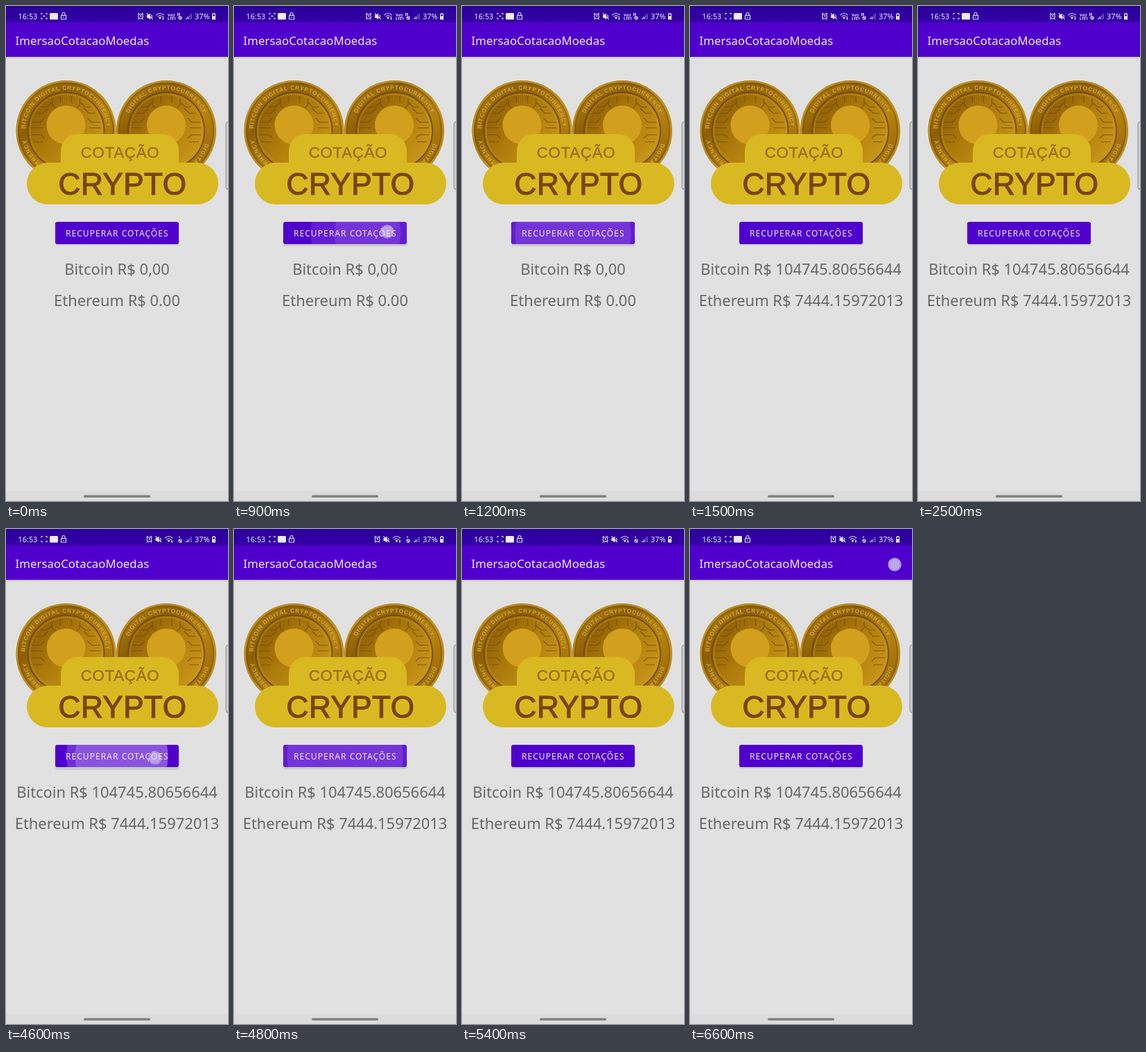
Write an HTML page that moves like this. It is 320 by 711 pixels and loops after 6.7 s.

```html
<!DOCTYPE html>
<html lang="pt">
<head>
<meta charset="utf-8">
<title>Cotação</title>
<style>
html, body { margin: 0; height: 100%; overflow: hidden; background: #e1e1e2; }
svg { display: block; width: 100vw; height: 100vh; font-family: "Noto Sans", sans-serif; }
.mid { text-anchor: middle; }
.price { font-size: 21.9px; fill: #686868; }
.line { fill: none; stroke: #e4dcf8; stroke-width: 1.1; }
.logo { font-family: "Liberation Sans", Arial, sans-serif; }
.rim { font: bold 8.2px "Liberation Sans", Arial, sans-serif; fill: #d2a538; letter-spacing: .9px; }
</style>
</head>
<body>
<svg viewBox="0 0 320 711" preserveAspectRatio="none">
  <defs>
    <linearGradient id="gold" x1="0" y1="0" x2="1" y2="1">
      <stop offset="0" stop-color="#bd8c12"/><stop offset=".3" stop-color="#8d5f04"/>
      <stop offset=".6" stop-color="#b5830f"/><stop offset="1" stop-color="#8d5d04"/>
    </linearGradient>
    <linearGradient id="face" x1="0" y1="0" x2="1" y2=".8">
      <stop offset="0" stop-color="#825403"/><stop offset=".5" stop-color="#ad7b0a"/>
      <stop offset="1" stop-color="#cb9919"/>
    </linearGradient>
    <linearGradient id="bar" x2="0" y2="1">
      <stop offset="0" stop-color="#2c009b"/><stop offset="1" stop-color="#3300a4"/>
    </linearGradient>
    <linearGradient id="shade" x2="0" y2="1">
      <stop offset="0" stop-color="#000" stop-opacity=".14"/><stop offset="1" stop-color="#000" stop-opacity="0"/>
    </linearGradient>
    <clipPath id="clip"><rect x="71" y="310" width="178" height="32" rx="3"/></clipPath>
    <path id="ring" d="M0 59A59 59 0 0 1 0-59A59 59 0 0 1 0 59"/>
    <path id="trace" d="M-49-12h12l6-6M-50-4h16M-50 6h14l5 5M-47 16h14M-42-25h9l7-7M-36-34h9l6-6M-20-46v9l5 5M-8-50v10"/>
    <g id="coin">
      <circle r="72" fill="url(#gold)"/>
      <circle r="70.5" fill="none" stroke="#c8971f" stroke-width="1.6"/>
      <circle r="68" fill="none" stroke="#6f4703" opacity=".7"/>
      <circle r="55" fill="url(#face)" stroke="#6d4503" stroke-width="1.5"/>
      <circle r="52" fill="none" stroke="#c99b28" stroke-width="1.6" stroke-dasharray="1.2 1.6"/>
      <g fill="none" stroke="#6d4503" stroke-width="1.2" opacity=".75">
        <use href="#trace"/><use href="#trace" transform="scale(-1 1)"/>
      </g>
      <circle cy="-8" r="28" fill="#d3a01d"/>
    </g>
  </defs>

  <rect width="320" height="711" fill="#e1e1e2"/>
  <rect y="697" width="320" height="14" fill="#dcdcdd"/>
  <rect x="112" y="702.5" width="96" height="3.5" rx="1.75" fill="#828283"/>
  <rect y="73" width="320" height="3" fill="url(#shade)"/>
  <rect y="23" width="320" height="50" fill="#5000cd"/>
  <rect width="320" height="23.5" fill="url(#bar)"/>
  <rect x="317" y="166.5" width="8" height="97" rx="3" fill="#d0d0d1" stroke="#858586"/>

  <g fill="#eee8fc" font-size="10.9">
    <text x="17.5" y="19">16:53</text>
    <path class="line" d="M51 12.5v-2h2M57 10.5h2v2M59 16.5v2h-2M53 18.5h-2v-2"/>
    <path id="dash" class="line" d="M53 14.5h4"/>
    <rect x="63" y="10" width="12" height="9.500" rx="1.5"/>
    <path class="line" d="M79.5 13.5h7v5.5h-7zM81 13.5v-2a2 2 0 0 1 4 0v2M83 15.5v1.5"/>
    <g id="left">
      <circle class="line" cx="194" cy="15" r="3.3"/>
      <path class="line" d="M194 13v2h1.5M190 12l2-2M198 12l-2-2M191.5 18l-1 1.5M196.5 18l1 1.5"/>
      <path d="M203 13h2l3-2.5v9l-3-2.5h-2z"/>
      <path class="line" d="M203 10.5l8.5 8.5M209.5 12.5q2 2.5 0 5"/>
      <path class="line" d="M216.5 13q5.500-5 11 0M218.5 15.2q3.500-3 7 0"/>
      <path d="M220 16.5q2-1.5 4 0l-2 2.5z"/>
      <path class="line" d="M226.5 15v4m-1-1l1 1 1-1"/>
    </g>
    <g id="volte" font-size="5.4" font-weight="600">
      <text x="233" y="14.5">Vo))</text><text x="233" y="19.8">LTE1</text>
      <path class="line" d="M247.5 10v4M249.5 10v4"/>
    </g>
    <path class="line" d="M248.8 17a2.200 2.200 0 1 0 4.400 0a2.200 2.200 0 1 0-4.400 0M249.5 15.5l3 3M250 10v3"/>
    <path d="M259.5 17h1.2v2h-1.2zM261.7 15.2h1.2V19h-1.2z"/>
    <path opacity=".45" d="M263.9 13.3h1.2V19h-1.2zM266.1 11h1.3v8h-1.300z"/>
    <text x="272" y="19">37%</text>
    <path d="M298.500 10h2v1h1.500v8.500h-5V11h1.500z"/>
    <path fill="#3300a4" d="M298 12h3v2.500h-3z"/>
  </g>
  <text x="13.5" y="55.5" font-size="16.7" fill="#f0eafa" letter-spacing=".1">ImersaoCotacaoMoedas</text>

  <use href="#coin" x="86.5" y="179"/>
  <use href="#coin" x="231" y="179"/>
  <g class="rim">
    <g transform="translate(86.5 179)">
      <text><textPath href="#ring" startOffset="95">BITCOIN DIGITAL CRYPTOCURRENCY</textPath></text>
      <text><textPath href="#ring" startOffset="40">RRENCY</textPath></text>
    </g>
    <g transform="translate(231 179)">
      <text><textPath href="#ring" startOffset="118">DIGITAL CRYPTOCURRENCY</textPath></text>
      <text><textPath href="#ring" startOffset="296">DIGITAL</textPath></text>
    </g>
  </g>
  <g fill="#d9b922">
    <rect x="79" y="184" width="170" height="70" rx="24"/>
    <rect x="30" y="225" width="276" height="60" rx="30"/>
  </g>
  <g class="logo mid">
    <text x="164.5" y="218" font-size="22.3" letter-spacing=".7" fill="#976a08" stroke="#976a08" stroke-width=".3">COTAÇÃO</text>
    <text x="168" y="271.3" font-size="44" letter-spacing=".5" fill="#744600" stroke="#744600" stroke-width="1.2">CRYPTO</text>
  </g>

  <rect id="lift" x="70.5" y="311" width="179" height="33" rx="4" fill="#000" opacity=".1"/>
  <g clip-path="url(#clip)">
    <rect x="71" y="310" width="178" height="32" fill="#5000cd"/>
    <circle id="ripple" cy="326" fill="#fff"/>
    <circle id="echo" cy="326" fill="#fff"/>
  </g>
  <text x="86" y="330.7" font-size="12" letter-spacing="1.05" fill="#efe8fa">RECUPERAR COTAÇÕES</text>
  <text id="btc" class="price mid" x="160" y="386"></text>
  <text id="eth" class="price mid" x="160" y="431"></text>
  <circle id="dot" r="9" fill="#e2dbf6" stroke="#c4b8ec" stroke-width="1.5"/>
</svg>
<script>
const LOOP = 6700, STEP = 100, FADE = 500, LAG = 70;
const taps = [
  { at: 800, x: 221, y: 324 },
  { at: 4400, x: 215, y: 329 },
  { at: 6600, x: 295, y: 51 }
];
const $ = id => document.getElementById(id);
const set = (id, attrs) => {
  for (const k in attrs) $(id).setAttribute(k, attrs[k]);
};
const write = (id, text) => {
  if ($(id).textContent !== text) $(id).textContent = text;
};

// a wave drifts from the finger to the button's centre as it grows
function wave(id, x, age, press) {
  const away = Math.max(0, 1 - Math.max(0, age) / 200) ** 2;
  set(id, { cx: 160 + (x - 160) * away, r: 57 + age * 0.08, opacity: 0.19 * press });
}

function draw(t) {
  const loaded = t >= 1500, moved = t >= 3800;
  write('btc', 'Bitcoin R$ ' + (loaded ? '104745.80656644' : '0,00'));
  write('eth', 'Ethereum R$ ' + (loaded ? '7444.15972013' : '0.00'));
  set('dash', { opacity: loaded ? 0 : 1 });
  set('volte', { opacity: moved ? 0 : 1 });
  set('left', { transform: `translate(${moved ? 12.5 : 0})` });

  const tap = taps.find(p => t >= p.at && t < p.at + FADE);
  const age = tap ? t - tap.at : FADE;
  const press = tap && tap.y > 300 ? Math.sin(Math.PI * age / FADE) : 0;
  const x = tap ? tap.x : 160;
  set('dot', { cx: x, cy: tap ? tap.y : 0, opacity: age < 300 ? 0.75 - age / 1000 : 0 });
  wave('ripple', x, age, press);
  wave('echo', x, age - LAG, press);
  set('lift', { y: 311 + 2 * press });
}

function tick() {
  const t = performance.now() % LOOP;
  draw(Math.floor(t / STEP) * STEP);
  requestAnimationFrame(tick);
}
tick();
</script>
</body>
</html>
```
